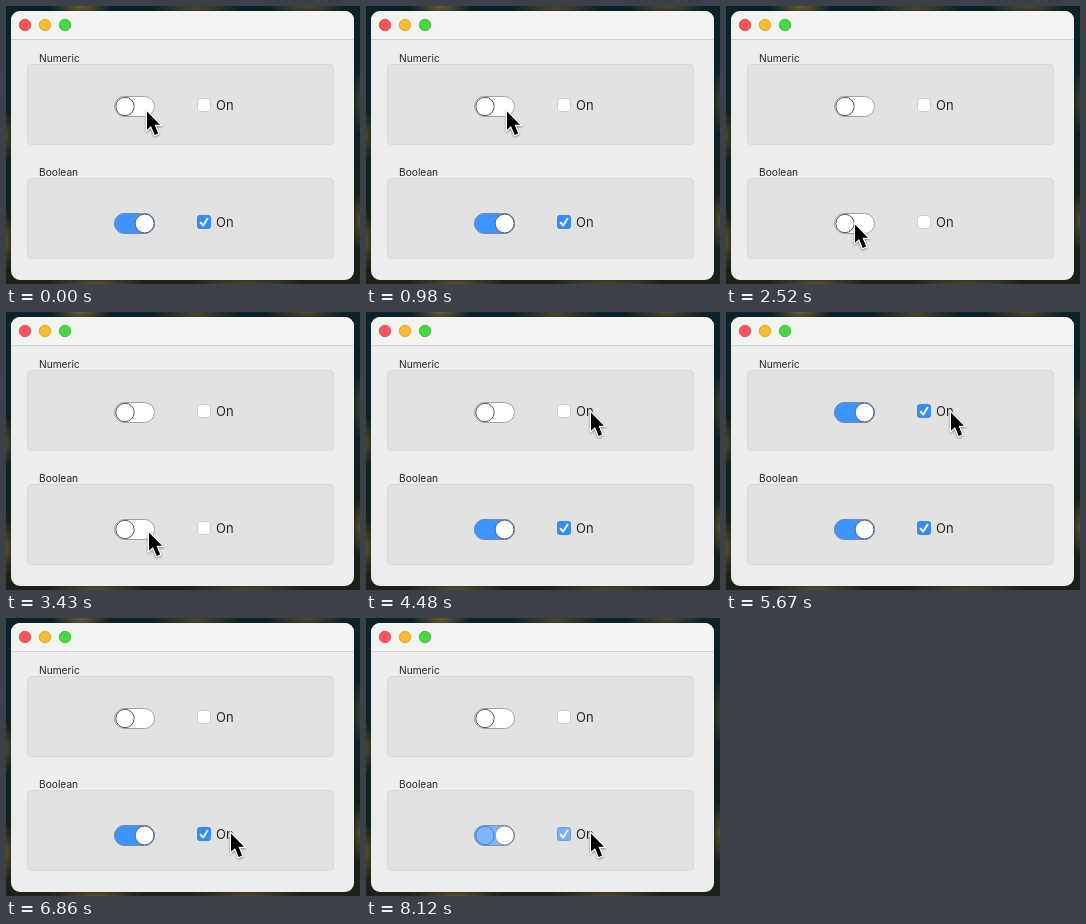
Animation of 354 by 278 pixels, one loop 8.19 s. Source, as an HTML page:

```html
<!DOCTYPE html>
<html lang="en">
<head>
<meta charset="utf-8">
<title>Toggle switches</title>
<style>
  html, body { margin: 0; width: 100%; height: 100%; overflow: hidden; }
  body {
    background:
      radial-gradient(ellipse 30px 12px at 75px 0, #6b5c30, #0000),
      radial-gradient(ellipse 44px 9px at 190px 2px, #4a4728, #0000),
      radial-gradient(ellipse 40px 10px at 300px 0, #544b2b, #0000),
      radial-gradient(ellipse 8px 26px at 0 130px, #4d4a29, #0000),
      radial-gradient(ellipse 8px 30px at 0 235px, #5b5129, #0000),
      radial-gradient(ellipse 8px 34px at 354px 95px, #3b4027, #0000),
      radial-gradient(ellipse 9px 30px at 354px 215px, #57502b, #0000),
      radial-gradient(ellipse 50px 9px at 90px 278px, #5c512b, #0000),
      radial-gradient(ellipse 60px 9px at 240px 278px, #4e4829, #0000),
      linear-gradient(#0b222a, #10211f 60%, #1b2118);
  }
  svg { display: block; width: 100%; height: 100%; }
  text { font-family: Inter, sans-serif; fill: #262626; }
  .label { font-size: 10.2px; }
  .on-text { font-size: 13px; }

  .numeric, .boolean, .pointer { animation: 8190ms linear infinite; }
  .numeric { animation-name: numeric; }
  .boolean { animation-name: boolean; }
  .pointer { animation-name: pointer; }

  /* Each cross-fade takes three 70 ms ticks. */
  @keyframes numeric {
    0%, 8.547%, 58.12%, 69.231% { animation-timing-function: steps(3); }
    0%, 1.709%, 11.111%, 58.12%, 71.795%, 100% { opacity: 0; }
    1.709% { animation-timing-function: steps(3); }
    4.274%, 8.547%, 60.684%, 69.231% { opacity: 1; }
  }
  @keyframes boolean {
    28.205%, 41.88%, 83.761%, 97.436% { animation-timing-function: steps(3); }
    0%, 28.205%, 44.444%, 83.761%, 100% { opacity: 1; }
    30.769%, 41.88%, 86.325%, 97.436% { opacity: 0; }
  }
  @keyframes pointer {
    0% { transform: translate(140px, 104px); }
    11.966% { transform: translate(140px, 104px); animation-timing-function: steps(5); }
    16.239% { transform: translate(143px, 107px); }
    18.803% { transform: translate(143px, 107px); animation-timing-function: steps(3); }
    21.368% { transform: translate(142px, 176px); animation-timing-function: steps(2); }
    23.077% { transform: translate(140px, 214px); animation-timing-function: steps(3); }
    25.641% { transform: translate(128px, 217px); }
    33.333% { transform: translate(128px, 217px); animation-timing-function: steps(2); }
    35.043% { transform: translate(134px, 217px); }
    36.752% { transform: translate(134px, 217px); animation-timing-function: steps(3); }
    39.316% { transform: translate(142px, 219px); }
    43.59% { transform: translate(142px, 219px); animation-timing-function: steps(3); }
    46.154% { transform: translate(131px, 219px); }
    48.718% { transform: translate(131px, 219px); animation-timing-function: steps(3); }
    51.282% { transform: translate(165px, 175px); animation-timing-function: steps(2); }
    52.991% { transform: translate(208px, 119px); animation-timing-function: steps(2); }
    54.701% { transform: translate(224px, 99px); }
    71.795% { transform: translate(224px, 99px); animation-timing-function: steps(6); }
    76.923% { transform: translate(224px, 236px); }
    77.778% { transform: translate(224px, 236px); animation-timing-function: steps(4); }
    81.197%, 100% { transform: translate(224px, 214px); }
  }
</style>
</head>
<body>
<svg viewBox="0 0 354 278">
  <defs>
    <g id="panel">
      <rect x="21.5" y="58.5" width="306" height="80" rx="4" fill="#e2e2e2" stroke="#d8d8d8"/>
      <text class="on-text" x="210" y="104">On</text>
    </g>
    <g id="off">
      <rect x="108.5" y="90.5" width="40" height="20" rx="10" fill="#fff" stroke="#a2a2a2"/>
      <circle cx="119" cy="100.5" r="9.2" fill="#fff" stroke="#555"/>
      <rect x="191.5" y="92.5" width="13" height="13" rx="3" fill="#fff" stroke="#cdcdcd"/>
    </g>
    <g id="on">
      <rect x="108.5" y="90.5" width="40" height="20" rx="10" fill="#3d94fe" stroke="#6f8bb0"/>
      <circle cx="138.6" cy="100.5" r="9.4" fill="#fff" stroke="#5c6478"/>
      <rect x="191" y="92" width="14" height="14" rx="3.2" fill="#368bf5"/>
      <path d="M194.6 99.6l2.6 3 4.4-7" fill="none" stroke="#fff" stroke-width="1.8" stroke-linecap="round" stroke-linejoin="round"/>
    </g>
  </defs>

  <rect x="5" y="5" width="343" height="269" rx="9" fill="#ededed"/>
  <path d="M5 33V14a9 9 0 0 1 9-9H339a9 9 0 0 1 9 9V33z" fill="#f2f4f1"/>
  <path d="M5 33.5H348" stroke="#d3d4d2"/>
  <g stroke-width=".8">
    <circle cx="19" cy="19" r="5.7" fill="#f9555b" stroke="#dc4148"/>
    <circle cx="39" cy="19" r="5.7" fill="#f8bb32" stroke="#dca023"/>
    <circle cx="59" cy="19" r="5.7" fill="#48d93f" stroke="#33b92f"/>
  </g>

  <text class="label" x="33" y="56">Numeric</text>
  <use href="#panel"/>
  <use href="#off"/>
  <use href="#on" class="numeric"/>

  <text class="label" x="33" y="170">Boolean</text>
  <rect x="21.5" y="172.5" width="306" height="80" rx="4" fill="#e2e2e2" stroke="#d8d8d8"/>
  <text class="on-text" x="210" y="221">On</text>
  <g transform="translate(0 117)">
    <use href="#off"/>
    <use href="#on" class="boolean"/>
  </g>

  <g class="pointer">
    <path d="M1 1.5V19.8L5 16 8.7 25 12.2 23.5 8.5 14.8H14z" stroke="#fff" stroke-width="2.4"
      paint-order="stroke" style="filter: drop-shadow(0 1.5px 1.2px #0006)"/>
  </g>
</svg>
</body>
</html>
```
